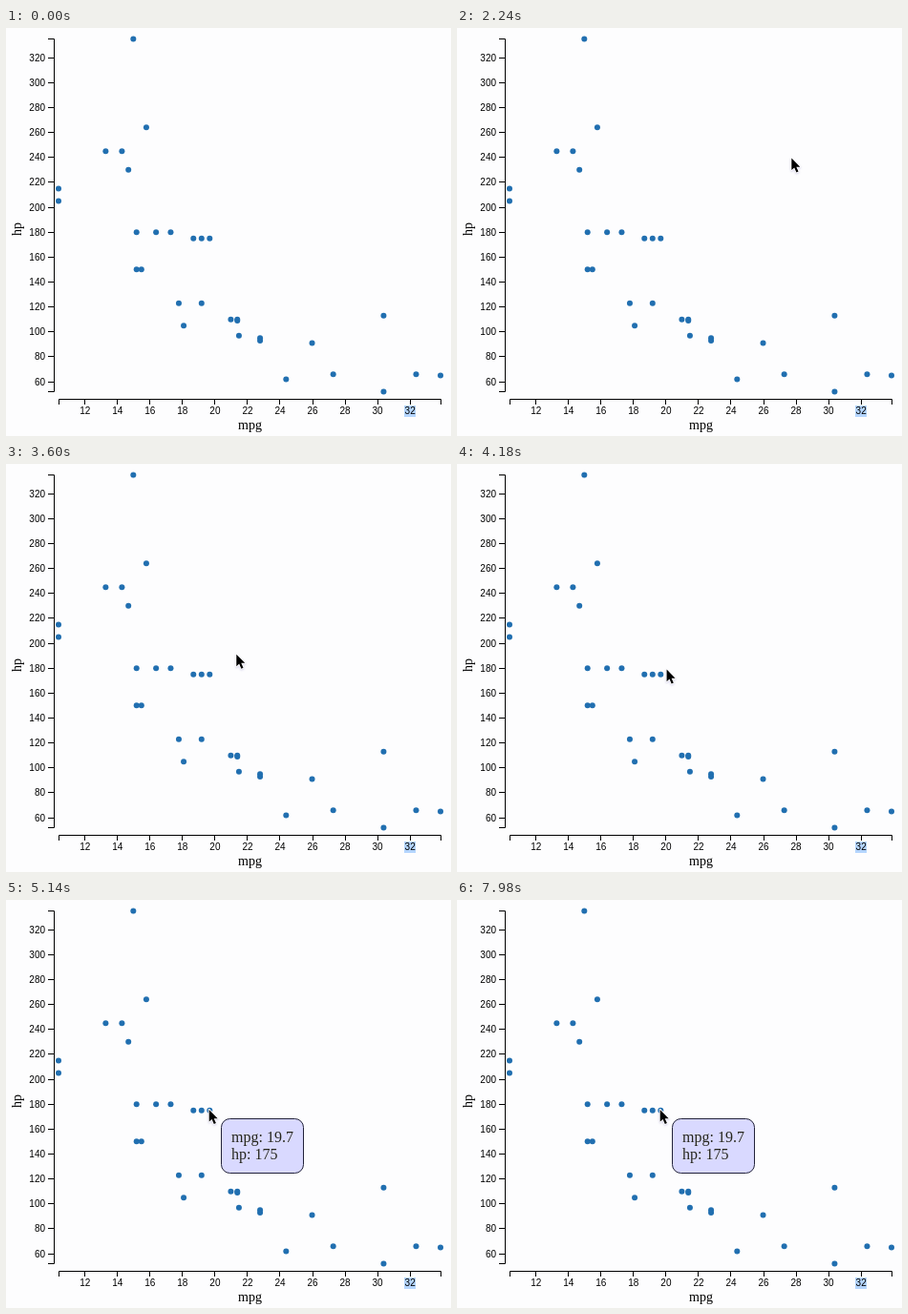
An HTML page with a canvas for the animation above (8000 ms loop, 466 by 428 pixels).

```html
<!DOCTYPE html>
<html lang="en">
<head>
<meta charset="utf-8">
<title>Scatter plot with tooltip</title>
<style>
html, body { margin: 0; width: 100%; height: 100%; overflow: hidden; background: #fdfdfe; }
canvas { display: block; width: 466px; height: 428px; }
</style>
</head>
<body>
<canvas id="stage"></canvas>
<script>
const W = 466, H = 428, LOOP = 8000;
const SANS = '10px "Liberation Sans", Arial, sans-serif';
const serif = size => `${size}px "Liberation Serif", Times, serif`;
const canvas = document.getElementById('stage');
const ctx = canvas.getContext('2d');
const ratio = window.devicePixelRatio || 1;
canvas.width = W * ratio;
canvas.height = H * ratio;

// Plotted values: horsepower -> miles per gallon
const cars = {
  335: [15], 264: [15.8], 245: [13.3, 14.3], 230: [14.7], 215: [10.4], 205: [10.4],
  180: [15.2, 16.4, 17.3], 175: [18.7, 19.2, 19.7], 150: [15.2, 15.5],
  123: [17.8, 19.2], 113: [30.4], 110: [21, 21.4], 109: [21.4], 105: [18.1],
  97: [21.5], 95: [22.8], 93: [22.8], 91: [26], 66: [27.3, 32.4], 65: [33.9],
  62: [24.4], 52: [30.4]
};
const arrow = new Path2D('M0 0V12.6L2.9 9.9 5.1 15 7.2 14 5 9.2H9Z');
const move = { start: 1640, end: 4740, from: [424.5, 122.6], to: [212.7, 220] };

const scaleX = mpg => 55 + (mpg - 10.4) * 400 / 23.5;
const scaleY = hp => 381.5 - (hp - 52) * 370 / 283;
const clamp = v => Math.max(0, Math.min(1, v));
const mix = (a, b, k) => a + (b - a) * k;
const crisp = v => Math.floor(v) + 0.5;

function label(text, x, y, font, align = 'center', color = '#000') {
  ctx.font = font;
  ctx.textAlign = align;
  ctx.fillStyle = color;
  ctx.fillText(text, x, y);
}

function line(...points) {
  ctx.beginPath();
  points.forEach(([x, y]) => ctx.lineTo(x, y));
  ctx.stroke();
}

function drawAxes() {
  ctx.strokeStyle = '#000';
  ctx.lineWidth = 1;
  line([44, 11.5], [50.5, 11.5], [50.5, 381.5], [44, 381.5]);
  for (let hp = 60; hp <= 320; hp += 20) {
    const y = crisp(scaleY(hp));
    line([44, y], [50, y]);
    label(hp, 41, y + 3.5, SANS, 'right');
  }
  line([55.5, 395], [55.5, 389.5], [455.5, 389.5], [455.5, 395]);
  ctx.fillStyle = '#b4d5fe';
  ctx.fillRect(417, 396, 12, 12);
  for (let mpg = 12; mpg <= 32; mpg += 2) {
    const x = scaleX(mpg) + 0.5;
    line([crisp(x), 390], [crisp(x), 395]);
    label(mpg, x, 405, SANS);
  }
  label('mpg', 255.5, 421, serif(14));
  ctx.save();
  ctx.translate(15.5, 211);
  ctx.rotate(-Math.PI / 2);
  label('hp', 0, 0, serif(14));
  ctx.restore();
}

function drawDots() {
  ctx.fillStyle = '#216fb0';
  for (const hp in cars) {
    for (const mpg of cars[hp]) {
      ctx.beginPath();
      ctx.arc(scaleX(mpg), scaleY(hp), 3, 0, Math.PI * 2);
      ctx.fill();
    }
  }
}

function drawTooltip(alpha) {
  if (!alpha) return;
  ctx.save();
  ctx.globalAlpha = alpha;
  ctx.beginPath();
  ctx.roundRect(225.5, 229.5, 86, 57, 9);
  ctx.fillStyle = '#d9d9ff';
  ctx.fill();
  ctx.strokeStyle = '#22223a';
  ctx.stroke();
  ['mpg: 19.7', 'hp: 175'].forEach((text, i) =>
    label(text, 236, 254 + 18 * i, serif(16), 'left', '#26261c'));
  ctx.restore();
}

// The pointer sweeps in from the right and slows to a stop on a dot
function drawPointer(t) {
  const left = Math.max(0, (move.end - t) / (move.end - move.start));
  const rise = 1 - (1 - left ** 2.2) ** 2;
  const x = mix(move.to[0], move.from[0], left ** 2);
  const y = mix(move.to[1], move.from[1], rise);
  if (x > W) return;
  ctx.save();
  ctx.translate(x, y);
  ctx.lineJoin = 'round';
  ctx.shadowColor = 'rgba(90, 80, 170, 0.25)';
  ctx.shadowBlur = 2 * ratio;
  ctx.shadowOffsetY = ratio;
  ctx.strokeStyle = '#fff';
  ctx.lineWidth = 1.8;
  ctx.stroke(arrow);
  ctx.shadowColor = 'transparent';
  ctx.fillStyle = '#000';
  ctx.fill(arrow);
  ctx.restore();
}

function draw(now) {
  const t = now % LOOP;
  ctx.setTransform(ratio, 0, 0, ratio, 0, 0);
  ctx.fillStyle = '#fdfdfe';
  ctx.fillRect(0, 0, W, H);
  drawAxes();
  drawDots();
  drawTooltip(clamp((t - 4800) / 200));
  drawPointer(t);
}

const start = performance.now();
function tick() {
  draw(performance.now() - start);
  requestAnimationFrame(tick);
}
tick();
</script>
</body>
</html>
```
